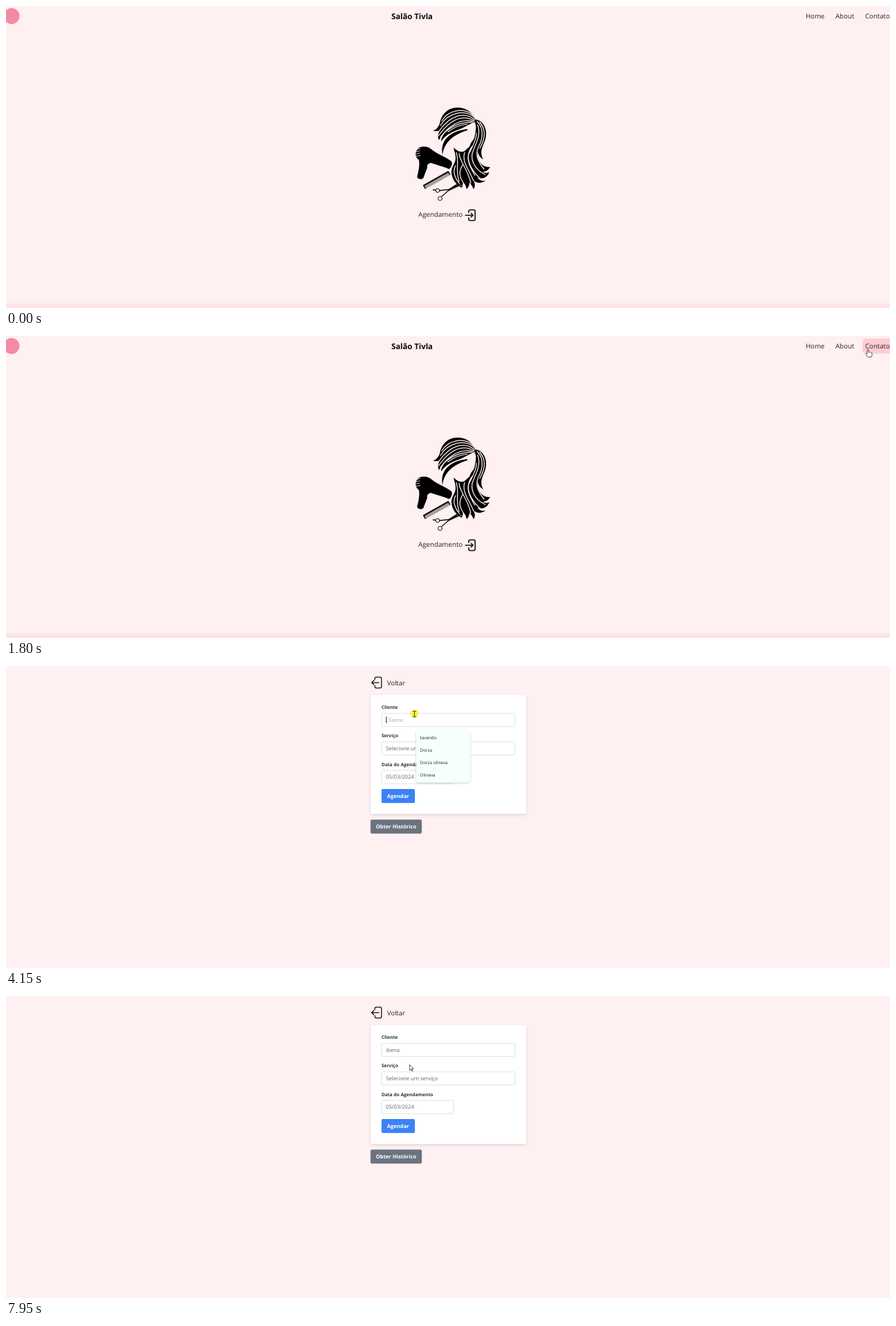
Write an HTML page that moves like this. It is 1280 px wide and 437 px high and loops after 8 s.

```html
<!DOCTYPE html>
<html lang="pt-BR">
<head>
<meta charset="utf-8">
<title>Agendamento</title>
<style>
  html, body { margin: 0; width: 100%; height: 100%; overflow: hidden; background: #fff0f1; }
  svg { display: block; width: 100vw; height: 100vh; }
  text { font-family: "Open Sans", "Noto Sans", sans-serif; fill: #262626; text-rendering: geometricPrecision; white-space: pre; }
  .title { font-size: 11.3px; font-weight: 700; fill: #0a0a0a; }
  .nav { font-size: 9.65px; }
  .label { font-size: 6.7px; font-weight: 700; fill: #2b3440; }
  .field { font-size: 7.7px; fill: #5b6472; }
  .btn { font-size: 7.65px; font-weight: 700; fill: #fff; }
  .item { font-size: 6.3px; fill: #222; }
  .box { fill: #fff; stroke: #e2e4e9; stroke-width: .8; filter: drop-shadow(0 .8px .7px #0002); }
  .card { fill: #fff; filter: drop-shadow(0 2px 2px #0000001c); }
  .menu { fill: #f7fffe; filter: drop-shadow(0 1px 1.5px #0003); }
  .line { fill: none; stroke: #111; stroke-linecap: round; stroke-linejoin: round; }
  .strands { fill: none; stroke: #fff0f1; stroke-linecap: round; }
  #glow { fill: #fdee30; opacity: .8; }
  .pointer { fill: #fff; stroke: #333; stroke-width: .8; stroke-linejoin: round; }
</style>
</head>
<body>
<svg viewBox="0 0 1280 437" preserveAspectRatio="none">
  <rect width="1280" height="437" fill="#fff0f1"/>

  <g id="home">
    <rect y="430.5" width="1280" height="7" fill="#ffe4e6"/>
    <circle cx="8" cy="14.5" r="11.5" fill="#f58aa5"/>
    <text class="title" x="558" y="19.3">Salão Tivla</text>
    <rect id="pill" y="3.5" height="22" rx="5.5" fill="#fecdd3"/>
    <text class="nav" x="1158" y="18.4">Home</text>
    <text class="nav" x="1201" y="18.4">About</text>
    <text class="nav" x="1244" y="18.4">Contato</text>

    <g id="hair">
      <path d="M680 167C677 152 663 146 652 147C638 148 630 158 628 170C626 176 622 180 618 180C622 182 626 181 628 180C625 186 625 190 627 194C630 188 634 184 639 181C633 186 630 190 630 196C638 184 650 181 660 177C668 173 675 169 680 167Z"/>
      <path d="M668 178C645 181 628 192 632 216C634 199 645 187 668 180Z"/>
      <path d="M680 164C692 166 698 180 694 193C690 205 685 211 691 222C685 218 683 214 683 208C681 222 688 234 701 233C698 238 694 240 690 240C694 242 697 242 700 240C696 250 688 251 682 248C686 253 691 254 695 252C688 258 680 256 677 252C679 257 680 261 677 265C675 260 673 258 671 255C671 260 669 263 667 265C666 260 664 258 662 255C661 259 661 261 660 263C650 258 645 248 645 240C645 232 651 228 651 220C651 214 649 210 648 205C652 208 655 211 660 211C664 211 666 208 668 206C672 204 672 200 674 197C677 194 679 190 679 186C681 178 681 172 678 167Z"/>
      <g class="strands" stroke-width="1.25">
        <path d="M677 158C662 146 640 151 631 166M678 161C664 149 640 154 629 173M678 164C664 153 644 157 627 181M678 166C664 158 646 160 626 188M677 167C660 163 644 170 629 190M675 168C658 168 648 173 636 182M668 171C656 172 648 176 640 182"/>
        <path d="M682 167C692 176 691 192 684 204C679 214 682 224 692 236M683 172C688 186 681 198 677 208C671 220 677 236 694 244M681 184C682 194 674 206 670 214C667 228 676 240 688 251M656 213C657 226 668 234 673 256M652 212C657 228 650 236 656 254M664 212C660 226 670 236 677 253M651 231C646 240 650 250 659 260M661 230C655 240 656 248 665 260M675 203C664 218 670 230 679 245M686 168C696 180 693 194 686 206"/>
      </g>
    </g>

    <g id="dryer">
      <path d="M598 205C606 202 613 204 618 209C626 215 636 218 644 224C647 226 646 231 643 235C641 236.5 639 235 637 234L615 227C611 228 609 231 610 234L605 247C604 251 601 251 598 250C595 249 595 247 596 244C598 236 599 229 598 223C592 219 591 211 598 205Z"/>
      <path class="strands" stroke-width=".8" d="M592 208.5L600 206M592 211.5L599 209.5M592 214.5L599 213M593 217.5L600 216.5"/>
    </g>

    <g id="comb" fill="none">
      <path d="M606.5 262.5L642 242.5" stroke="#777" stroke-width="5" stroke-dasharray=".8 .4"/>
      <path d="M604.5 260L641 239.5" stroke="#111" stroke-width="2.2"/>
      <path d="M604.5 259.5L607.5 264.5M640 239.5L643 244" stroke="#111" stroke-width="1.5"/>
    </g>

    <g id="scissors" class="line">
      <path d="M628 267L642 265.5M631 275.5L643 265M618.5 266L622 266.5" stroke-width="1.3"/>
      <path d="M641 266.5L658 258.5M641 266L655 257" stroke-width="2"/>
      <circle cx="625" cy="267" r="2.8" stroke-width="1"/>
      <circle cx="628.5" cy="278.5" r="3" stroke-width="1"/>
    </g>

    <text x="597" y="305.3" font-size="9.75">Agendamento</text>
    <path class="line" stroke-width="1.6" d="M670 299V297.5Q670 295 672.5 295H677Q679.3 295 679.3 297.5V308Q679.3 310.5 677 310.5H672.5Q670 310.5 670 308V306.5M665.3 302.7H676M673.5 300L676.2 302.7L673.5 305.4"/>
  </g>

  <g id="form">
    <path class="line" stroke-width="1.25" d="M534 20V18.5Q534 16.2 536.3 16.2H541.4Q543.7 16.2 543.7 18.5V29.5Q543.7 31.8 541.4 31.8H536.3Q534 31.8 534 29.5V28M540 24H529.5M532.5 21L529.5 24L532.5 27"/>
    <text x="551.7" y="27.9" font-size="9.5">Voltar</text>
    <rect class="card" x="528" y="42" width="225" height="172" rx="2"/>
    <text class="label" x="543.7" y="61.8">Cliente</text>
    <rect class="box" x="543.8" y="68.5" width="193" height="19" rx="2"/>
    <text class="label" x="543.7" y="103.1">Serviço</text>
    <rect class="box" x="543.8" y="109.8" width="193" height="19" rx="2"/>
    <text class="field" x="550" y="122.2">Selecione um serviço</text>
    <text class="label" x="543.7" y="144.5">Data do Agendamento</text>
    <rect class="box" x="543.8" y="151.2" width="104" height="19" rx="2"/>
    <text class="field" x="550" y="163.4">05/03/2024</text>
    <rect x="543.7" y="178" width="48.3" height="20.2" rx="2" fill="#3b82f6"/>
    <text class="btn" x="551.7" y="191">Agendar</text>
    <rect x="527.8" y="222.2" width="74.2" height="20.2" rx="2" fill="#6b7280"/>
    <text class="btn" x="535.5" y="235.2">Obter Histórico</text>
    <text class="field" id="client" x="550" y="80.9"></text>
    <rect id="caret" y="73" width=".8" height="10" fill="#222"/>
    <g id="menu">
      <path class="menu" d="M598 92.5H601L604 89.8L607 92.5H668Q672 92.5 672 96.5V164.5Q672 168.5 668 168.5H598Q594 168.5 594 164.5V96.5Q594 92.5 598 92.5Z"/>
      <text class="item" x="599.6" y="105.7">tavendo</text>
      <text class="item" x="599.6" y="123.7">Dorza</text>
      <text class="item" x="599.6" y="141.8">Dorza olineva</text>
      <text class="item" x="599.6" y="159.8">Olineva</text>
    </g>
  </g>

  <circle id="glow" r="6.2"/>
  <g id="cursor">
    <path id="arrow" class="pointer" d="M.4 .4V8.6L2.3 6.9L3.6 9.8L4.9 9.2L3.6 6.4H6Z"/>
    <path id="hand" class="pointer" d="M-.9 7V1Q0-.3 .9 1V4.6Q2 3.8 2.7 4.9Q3.8 4.3 4.4 5.3Q5.9 5 5.9 6.6V8.5Q5.9 10 5 11.6H-.1L-3 7.6Q-3.2 6 -1.9 6.2Z"/>
    <path id="beam" class="line" stroke-width=".8" d="M-2-3.5H-.6L0-3L.6-3.5H2M0-3V4M-2 4.5H-.6L0 4L.6 4.5H2"/>
  </g>
</svg>
<script>
  const LOOP = 8000, STEP = 66.9, FIRST = 390, OPEN_FORM = 3540, FOCUS = 4150, BLINK = 530;
  const $ = id => document.getElementById(id);
  const show = (id, on) => { $(id).style.display = on ? '' : 'none'; };
  const within = (v, a, b) => v >= a && v < b;

  // Mouse path: time, x, y
  const path = [
    [390, 1017, 417], [800, 1230, 43], [1000, 1230, 43], [1200, 1214, 22],
    [1390, 1171, 13], [1460, 1171, 13], [1600, 1212, 13], [1800, 1249, 19],
    [1865, 1250, 20], [2080, 1250, 20], [2200, 1100, 75], [2330, 835, 185],
    [2395, 767, 207], [2560, 690, 216], [2830, 632, 219], [2900, 630, 219],
    [3150, 660, 270], [3330, 672, 303], [3680, 672, 303], [3940, 600, 110],
    [4075, 591.5, 69], [7750, 591.5, 69], [7948, 584, 99]
  ];
  const pills = [[1154, 35], [1197, 35], [1240, 44]];
  const name = 'ibena';
  const keyTimes = [6340, 6540, 6760, 7220, 7350];

  function mouseAt(t) {
    const s = FIRST + Math.floor((t - FIRST) / STEP) * STEP;
    const i = path.findIndex(p => p[0] > s);
    if (i === 0) return path[0].slice(1);
    if (i < 0) return path[path.length - 1].slice(1);
    const [t0, x0, y0] = path[i - 1], [t1, x1, y1] = path[i];
    const k = (s - t0) / (t1 - t0);
    return [x0 + (x1 - x0) * k, y0 + (y1 - y0) * k];
  }

  function drawCursor(t, onForm) {
    const [x, y] = mouseAt(t);
    const pill = !onForm && y < 26 && pills.find(p => within(x, p[0], p[0] + p[1]));
    const onIcon = t < 3740 && x > 664 && y > 294 && y < 312;
    const beam = onForm && y < 88;
    const hand = !beam && (pill || onIcon);
    show('cursor', t >= FIRST);
    show('hand', hand);
    show('beam', beam);
    show('arrow', !hand && !beam);
    $('cursor').setAttribute('transform', `translate(${x} ${y})`);

    show('pill', pill && t >= FIRST);
    if (pill) {
      $('pill').setAttribute('x', pill[0]);
      $('pill').setAttribute('width', pill[1]);
    }
    show('glow', within(t, 3400, OPEN_FORM) || within(t, 4075, 4350));
    $('glow').setAttribute('cx', x);
    $('glow').setAttribute('cy', y);
  }

  function drawField(t) {
    const count = keyTimes.filter(k => t >= k).length;
    const client = $('client');
    client.textContent = count ? name.slice(0, count) : 'Cliente';
    client.style.fill = count ? '' : '#a5abb6';
    const last = count ? keyTimes[count - 1] : FOCUS;
    const lit = t >= FOCUS && Math.floor((t - last) / BLINK) % 2 === 0;
    show('caret', lit);
    $('caret').setAttribute('x', 550 + (count ? client.getComputedTextLength() : 0));
    show('menu', within(t, FOCUS, 6410));
  }

  function render() {
    const t = performance.now() % LOOP;
    const onForm = t >= OPEN_FORM;
    show('home', !onForm);
    show('form', onForm);
    drawCursor(t, onForm);
    if (onForm) drawField(t);
    requestAnimationFrame(render);
  }
  render();
</script>
</body>
</html>
```
